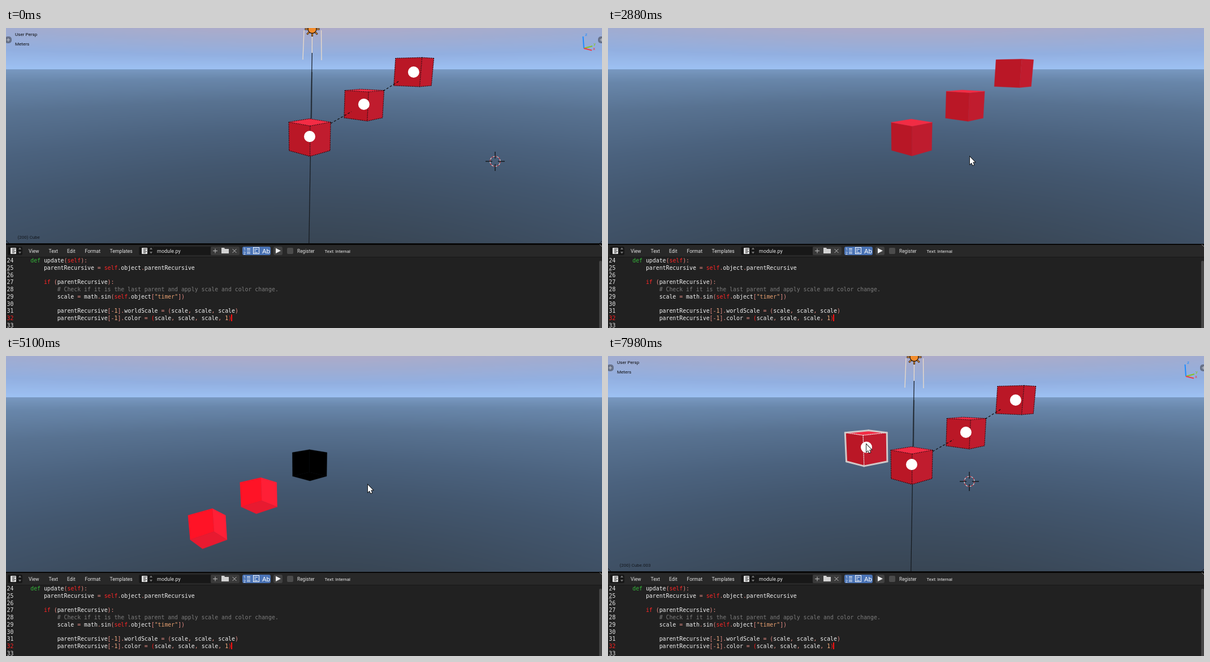
An HTML page with a canvas that plays this animation: 1054x531 px, repeating every 8000 ms.

```html
<!DOCTYPE html>
<html lang="en">
<head>
<meta charset="utf-8">
<title>Cube scaling demo</title>
<style>
html, body { margin: 0; width: 100%; height: 100%; overflow: hidden; background: #212121; }
canvas { display: block; width: 1054px; height: 531px; }
</style>
</head>
<body>
<canvas id="stage" width="1054" height="531"></canvas>
<script>
const W = 1054, H = 531, VIEW_H = 382, LOOP = 8000, STEP = 60;
const ctx = document.getElementById('stage').getContext('2d');
const UI = 'Roboto, sans-serif';
const MONO = '"DejaVu Sans Mono", monospace';

// Camera: focal length, distance to the root cube, downward pitch, screen centre
const F = 530, D = 20.5, PITCH = 0.219, CX = 527, CY = 191;
const SIN = Math.sin(PITCH), COS = Math.cos(PITCH);

// Offsets from the root cube: screen right, screen down, relative depth
const CHILDREN = [
  { a: 103, c: -60.8, b: 0.067 },
  { a: 201.5, c: -124.3, b: 0.091 }
];
const OUTSIDE = { left: [186, 23, 38], right: [192, 28, 46], top: [243, 44, 69] };
const INSIDE = { left: [255, 31, 54], right: [255, 19, 38], top: [232, 26, 48] };

const clamp = v => Math.max(0, Math.min(1, v));
const mix = (a, b, k) => a + (b - a) * k;
const easeOut = k => 1 - (1 - k) ** 2;
const smooth = k => k * k * (3 - 2 * k);
const rgb = (c, k = 1) => `rgb(${c.map(v => Math.round(v * k)).join(',')})`;

function layer(w, h) {
  const c = document.createElement('canvas');
  c.width = w;
  c.height = h;
  return c;
}

function line(g, pts, color, width = 1, dash = []) {
  g.beginPath();
  pts.forEach(p => g.lineTo(p[0], p[1]));
  g.strokeStyle = color;
  g.lineWidth = width;
  g.setLineDash(dash);
  g.stroke();
  g.setLineDash([]);
}

function poly(g, pts, color) {
  g.beginPath();
  pts.forEach(p => g.lineTo(p[0], p[1]));
  g.closePath();
  g.fillStyle = color;
  g.fill();
}

function disc(g, x, y, r, color) {
  g.beginPath();
  g.arc(x, y, r, 0, 7);
  g.fillStyle = color;
  g.fill();
}

function box(g, x, y, w, h, color, r = 0) {
  g.beginPath();
  g.roundRect(x, y, w, h, r);
  g.fillStyle = color;
  g.fill();
}

function label(g, str, x, y, size, color, family = UI) {
  g.font = `${size}px ${family}`;
  g.textBaseline = 'alphabetic';
  g.fillStyle = color;
  g.fillText(str, x, y);
}

// ---- World background, shaded by the elevation of each view ray ----
const SKY = [
  [-0.54, 56, 69, 83], [-0.4, 62, 79, 99], [-0.3, 67, 87, 111], [-0.2, 75, 98, 126],
  [-0.1, 88, 114, 145], [-0.03, 104, 134, 170], [0, 120, 152, 192],
  [0.0005, 157, 193, 243], [0.045, 146, 175, 224], [0.09, 160, 172, 209], [0.13, 174, 171, 200]
];

function skyColor(e) {
  let i = 1;
  while (i < SKY.length - 1 && SKY[i][0] < e) i++;
  const p = SKY[i - 1], q = SKY[i];
  const k = clamp((e - p[0]) / (q[0] - p[0]));
  return [1, 2, 3].map(n => mix(p[n], q[n], k));
}

function makeWorld() {
  const c = layer(W, VIEW_H), g = c.getContext('2d');
  const img = g.createImageData(W, VIEW_H);
  for (let y = 0, o = 0; y < VIEW_H; y++) {
    for (let x = 0; x < W; x++, o += 4) {
      const v = CY - y;
      const e = (v * COS - F * SIN) / Math.hypot(x - CX, v, F);
      img.data.set([...skyColor(e), 255], o);
    }
  }
  g.putImageData(img, 0, 0);
  return c;
}

// ---- Text editor panel ----
const CODE = [
  '    def update(self):',
  '        parentRecursive = self.object.parentRecursive',
  '',
  '        if (parentRecursive):',
  '            # Check if it is the last parent and apply scale and color change.',
  '            scale = math.sin(self.object["timer"])',
  '',
  '            parentRecursive[-1].worldScale = (scale, scale, scale)',
  '            parentRecursive[-1].color = (scale, scale, scale, 1)',
  ''
];
const TOKEN = /#.*|"[^"]*"|\w+|[^\w\s]/g;

function tokenColor(t) {
  if (t[0] === '#') return '#7c7c7c';
  if (t[0] === '"') return '#e8a070';
  if (t === 'def') return '#35b53a';
  if (t === 'self' || t === 'if') return '#ff2626';
  if (/^\d/.test(t)) return '#f5b080';
  return /\w/.test(t) ? '#f2f2f2' : '#e58c84';
}

function drawCode(g) {
  const x0 = 19.5, cw = 5.93;
  CODE.forEach((src, i) => {
    const y = 415.2 + i * 12.72, active = i === 8;
    label(g, 24 + i, 1.5, y, 9.85, active ? '#ff2020' : '#e6e6e6', MONO);
    for (const m of src.matchAll(TOKEN)) {
      const bracket = active && (m.index === 40 || m.index === 63);
      label(g, m[0], x0 + m.index * cw, y, 9.85, bracket ? '#ff1818' : tokenColor(m[0]), MONO);
    }
  });
  box(g, 398, 507, 2, 12, '#ff1010');
  line(g, [[1, 429.5], [7, 429.5]], '#777');
  line(g, [[4, 427], [4, 433]], '#777');
}

function docIcon(g, x) {
  box(g, x, 387, 26, 15, '#171717', 3);
  box(g, x + 5, 389, 10, 11, '#dedede', 1);
  for (let i = 0; i < 4; i++) box(g, x + 8, 390.5 + i * 2.3, i % 2 ? 4 : 6, 1, '#333');
  poly(g, [[x + 19, 392], [x + 21.5, 388.5], [x + 24, 392]], '#777');
  poly(g, [[x + 19, 396], [x + 21.5, 399.5], [x + 24, 396]], '#777');
}

function makePanel() {
  const c = layer(W, H - VIEW_H), g = c.getContext('2d');
  g.translate(0, -VIEW_H);
  box(g, 0, VIEW_H, W, H, '#212121');
  box(g, 0, VIEW_H, W, 23, '#282828');
  box(g, 0, VIEW_H, W, 2, '#070707');
  box(g, 0, 405, W, 1, '#171717');
  docIcon(g, 3);
  const menu = { View: 40, Text: 75.5, Edit: 108, Format: 139.5, Templates: 183.5 };
  for (const name in menu) label(g, name, menu[name], 397.7, 8.6, '#e4e4e4');
  docIcon(g, 235);
  box(g, 261, 387, 101, 15, '#181818');
  label(g, 'module.py', 267, 397.7, 9, '#e4e4e4');
  box(g, 362, 387, 51, 15, '#3a3a3a', 3);
  line(g, [[366, 394.5], [374, 394.5]], '#bbb');
  line(g, [[370, 390.5], [370, 398.5]], '#bbb');
  poly(g, [[381, 389], [386, 389], [387, 391], [394, 391], [394, 399], [381, 399]], '#d2d2d2');
  line(g, [[400.5, 391], [407.5, 398]], '#bbb');
  line(g, [[407.5, 391], [400.5, 398]], '#bbb');
  box(g, 418, 387, 50, 15, '#4a73b5', 3);
  for (let i = 0; i < 2; i++) {
    label(g, i + 1, 420, 393.5 + i * 7, 7, '#fff');
    for (let j = 0; j < 2; j++) box(g, 426, 390 + i * 6 + j * 2.5, 6, 1, '#fff');
  }
  g.strokeStyle = '#fff';
  g.strokeRect(437.5, 388.5, 10, 11);
  for (let i = 0; i < 3; i++) box(g, 439, 391 + i * 3, i === 1 ? 3 : 6, 1, '#fff');
  label(g, 'Ab', 453, 398.5, 11.5, '#fff');
  box(g, 473, 387, 16, 15, '#414141', 3);
  poly(g, [[477, 389.5], [486, 394.3], [477, 399]], '#efefef');
  box(g, 497, 389, 11, 11, '#4b4b4b', 2);
  label(g, 'Register', 515, 397.7, 8.4, '#e4e4e4');
  label(g, 'Text: Internal', 563.5, 397.7, 7.9, '#efefef');
  box(g, 1049, 412, 5, H, '#454545', 2);
  line(g, [[1050, 383], [1054, 387]], '#888');
  drawCode(g);
  return c;
}

// ---- Cubes ----
const CORNERS = [[-Math.SQRT2, 0], [0, -Math.SQRT2], [Math.SQRT2, 0], [0, Math.SQRT2]];
const FACES = [[0, 1, 5, 4], [1, 2, 6, 5], [2, 3, 7, 6], [3, 0, 4, 7], [3, 2, 1, 0]];
const FACE_NAMES = ['left', 'right', 'left', 'right', 'top'];

// Cube centre from screen offsets u, v (at the root's distance) and relative depth
const place = (u, v, depth = 1) => ({ x: u * D / F, y: v * D / F, z: D * depth });
const ROOT = place(10, 1);
const childPlace = (ch, s) => place(10 + s * ch.a, 1 + s * ch.c, 1 + s * ch.b);
const screen = p => [CX + F * p.x / p.z, CY + F * p.y / p.z];

function cubePoints(c, s) {
  return [1, -1].flatMap(h => CORNERS.map(([x, y]) => screen({
    x: c.x + s * x,
    y: c.y - s * (h * COS + y * SIN),
    z: c.z + s * (y * COS - h * SIN)
  })));
}

function facesViewer(pts) {
  let area = 0;
  pts.forEach((p, i) => {
    const q = pts[(i + 1) % pts.length];
    area += p[0] * q[1] - q[0] * p[1];
  });
  return area > 0;
}

function drawCube(c, s, tint = 1) {
  const pts = cubePoints(c, s), palette = s < 0 ? INSIDE : OUTSIDE, edges = new Map();
  FACES.forEach((face, i) => {
    const quad = face.map(n => pts[n]);
    if (!facesViewer(quad)) return;
    const color = rgb(palette[FACE_NAMES[i]], tint);
    poly(ctx, quad, color);
    line(ctx, [...quad, quad[0]], color, 0.4);
    face.forEach((n, j) => {
      const m = face[(j + 1) % 4], key = [n, m].sort().join();
      const shared = edges.has(key);
      edges.set(key, { pts: [pts[Math.min(n, m)], pts[Math.max(n, m)]], shared });
    });
  });
  return [...edges.values()];
}

function drawEditCube(c, selected) {
  const edges = drawCube(c, 1);
  ctx.lineCap = selected ? 'round' : 'butt';
  for (const e of edges) {
    if (selected && !e.shared) line(ctx, e.pts, '#d0c8c8', 3);
    else line(ctx, e.pts, selected ? '#eee' : '#100406', 1.2, [1.5, 1.7]);
  }
  ctx.lineCap = 'butt';
  disc(ctx, ...screen(c), 10, '#fff');
}

function drawGame(t) {
  const s = Math.sin((t - 1211) * 0.00106);
  const jobs = [
    { c: ROOT, tint: Math.max(0, s) ** (1 / 2.2) },
    ...CHILDREN.map(ch => ({ c: childPlace(ch, s), tint: 1 }))
  ];
  jobs.sort((p, q) => q.c.z - p.c.z).forEach(j => drawCube(j.c, s, j.tint));
}

// ---- Viewport overlays ----
function drawLamp() {
  const cream = '#ecdcc8';
  line(ctx, [[527, 4], [525, 56]], cream, 1.3);
  line(ctx, [[557.5, 4], [558, 57]], cream, 1.3);
  line(ctx, [[541.5, 10], [541.3, 44]], cream, 1.3);
  line(ctx, [[541.3, 44], [535.8, 381]], '#15181c', 1.2);
  line(ctx, [[541, 78], [540, 160]], 'rgba(30,35,42,.5)', 2.4);
  for (let i = 0; i < 8; i++) {
    const a = i * Math.PI / 4, at = r => [541.5 + r * Math.cos(a), 2 + r * Math.sin(a)];
    line(ctx, [at(7), at(13)], '#221408', 3);
    line(ctx, [at(7), at(12.3)], '#f59a3a', 1.4);
  }
  disc(ctx, 541.5, 2, 8, '#221408');
  disc(ctx, 541.5, 2, 6.8, '#f28c2c');
}

function drawAxes() {
  line(ctx, [[1022, 36], [1020.5, 15]], '#1f8cff', 2);
  line(ctx, [[1022, 36], [1037, 32]], '#86c520', 2);
  line(ctx, [[1022, 36], [1036, 39.5]], '#f03a4a', 2);
  label(ctx, 'z', 1024, 14, 8, '#1f8cff');
  label(ctx, 'y', 1039, 31, 8, '#86c520');
  label(ctx, 'x', 1038, 39, 8, '#f03a4a');
  for (const x of [4, 1053]) {
    box(ctx, x - 6, 15, 12, 12, 'rgba(85,92,108,.75)', 5);
    line(ctx, [[x - 3, 21], [x + 3, 21]], '#c5c9d2');
    line(ctx, [[x, 18], [x, 24]], '#c5c9d2');
  }
}

function drawTarget(x, y) {
  const arc = Math.PI / 8;
  for (let i = 0; i < 16; i++) {
    ctx.beginPath();
    ctx.arc(x, y, 9, i * arc, (i + 1) * arc);
    ctx.strokeStyle = i % 2 ? '#f4dada' : '#d8323a';
    ctx.lineWidth = 1.2;
    ctx.stroke();
  }
  for (const [dx, dy] of [[1, 0], [-1, 0], [0, 1], [0, -1]])
    line(ctx, [[x + 5 * dx, y + 5 * dy], [x + 17 * dx, y + 17 * dy]], '#0a0a0a', 1.2);
}

function drawGizmo(x, y) {
  const arms = [[0, -127, '#2a6cf0'], [106, -21, '#7cc41c'], [104, 20, '#ea2c3c']];
  for (const [dx, dy, color] of arms) {
    const len = Math.hypot(dx, dy), ux = dx / len, uy = dy / len;
    const bx = x + dx - ux * 19, by = y + dy - uy * 19;
    line(ctx, [[x + ux * 10, y + uy * 10], [bx, by]], color, 2);
    poly(ctx, [[x + dx, y + dy], [bx - uy * 5, by + ux * 5], [bx + uy * 5, by - ux * 5]], color);
  }
  ctx.beginPath();
  ctx.arc(x, y, 13, 0, 7);
  ctx.strokeStyle = '#eee';
  ctx.lineWidth = 1;
  ctx.stroke();
}

function drawPointer([x, y]) {
  const shape = [[0, 0], [0, 13], [3, 10.4], [5, 15], [7.2, 14], [5.2, 9.6], [9, 9.3]]
    .map(([dx, dy]) => [x + dx, y + dy]);
  line(ctx, [...shape, shape[0], shape[1]], '#111', 1.8);
  poly(ctx, shape, '#fff');
}

function pointerAt(t) {
  if (t < 180) return null;
  if (t < 2100) {
    const k = easeOut(clamp((t - 180) / 540));
    return [mix(1041, 640, k), mix(46, 222, k)];
  }
  const drop = clamp((t - 2100) / 300);
  const toCube = smooth(clamp((t - 6960) / 360));
  const drag = smooth(clamp((t - 7680) / 300));
  return [
    mix(640, 537, toCube) - 80 * drag,
    mix(mix(222, 228, drop), 187, toCube) - 30.5 * drag
  ];
}

function drawEdit(t) {
  const selected = t >= 7320, copied = t >= 7740;
  drawLamp();
  [...CHILDREN].reverse().forEach(ch => drawEditCube(childPlace(ch, 1), false));
  drawEditCube(ROOT, selected && !copied);
  line(ctx, [[574, 169], [611, 148]], '#0c0c0c', 1.2, [4, 3]);
  line(ctx, [[667, 111.5], [695, 94]], '#0c0c0c', 1.2, [4, 3]);
  if (copied) {
    const k = smooth(clamp((t - 7680) / 300));
    drawEditCube(place(10 - 80 * k, 1 - 30.5 * k), true);
  } else if (selected) {
    drawGizmo(537, 192);
  }
  drawAxes();
  if (t < 720) drawTarget(865, 236);
  else drawTarget(639, 222);
  label(ctx, 'User Persp', 16, 14.3, 8.1, '#0c0d10');
  label(ctx, 'Meters', 16, 31.3, 8.1, '#0c0d10');
  label(ctx, copied ? '(200) Cube.003' : '(200) Cube', 20.5, 373.3, 8, '#14181e');
  line(ctx, [[0, 376], [6, 382]], '#15181c');
  line(ctx, [[1049, 382], [1054, 377]], '#15181c');
  box(ctx, 0, 381, W, 1, '#0a0a0a');
}

const world = makeWorld(), panel = makePanel();

function render(t) {
  ctx.drawImage(world, 0, 0);
  if (t >= 1260 && t < 6840) drawGame(t);
  else drawEdit(t);
  const pointer = pointerAt(t);
  if (pointer) drawPointer(pointer);
  ctx.drawImage(panel, 0, VIEW_H);
}

const start = performance.now();
function tick() {
  const t = (performance.now() - start) % LOOP;
  render(Math.floor(t / STEP) * STEP);
  requestAnimationFrame(tick);
}
tick();
</script>
</body>
</html>
```
